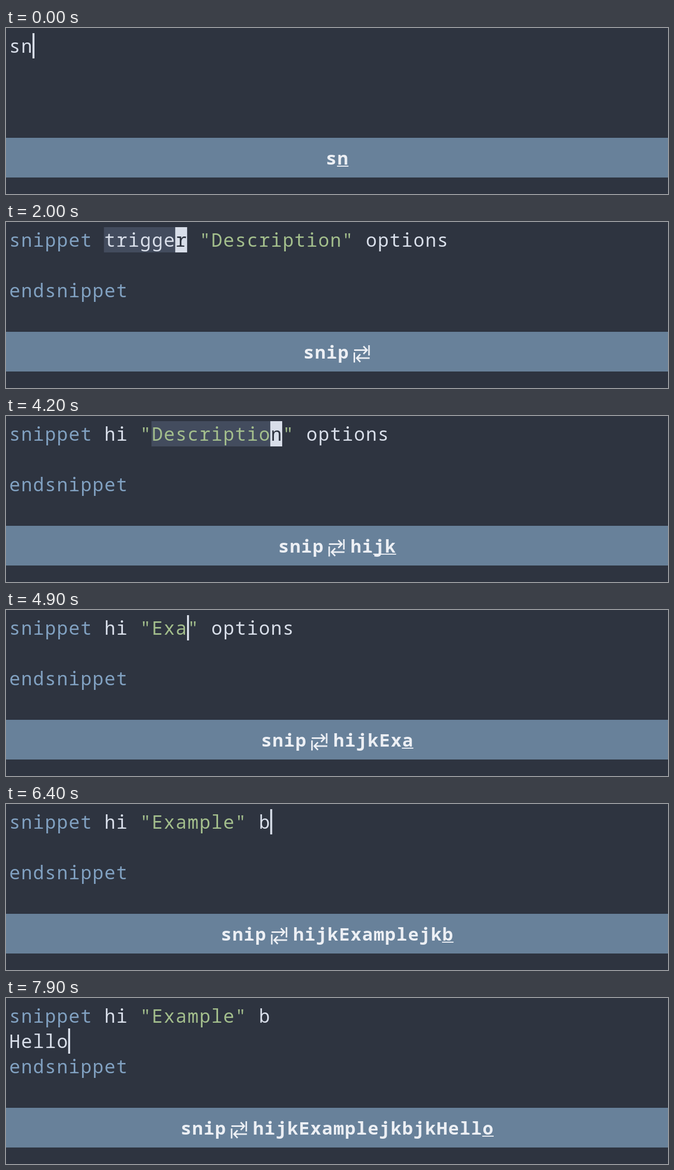
Animation, 1280 px wide and 322 px high, one loop 8 s. Source, as an HTML page:

```html
<!DOCTYPE html>
<html lang="en">
<head>
<meta charset="utf-8">
<title>Snippet expansion</title>
<style>
  html, body { margin: 0; width: 100%; height: 100%; overflow: hidden; background: #2e3440; }
  svg { display: block; width: 1280px; height: 322px; }
  text { font-family: "Noto Sans Mono", "DejaVu Sans Mono", monospace; white-space: pre; }
  .code { font-size: 35.5px; letter-spacing: 1.68px; }
  .key { font-size: 34.5px; font-weight: 700; letter-spacing: 1.5px; fill: #eceff4; }
</style>
</head>
<body>
<svg viewBox="0 0 1280 322">
  <rect width="1280" height="322" fill="#2e3440"/>
  <g id="editor"></g>
  <rect y="213" width="1280" height="77" fill="#68819a"/>
  <g id="keys"></g>
</svg>
<script>
const LOOP = 8000, HOLD = 200, EXPAND = 1900;
const CELL = 22.98, LEFT = 5.5, TOP = 10, ROW = 49;
const KEY = 22.2, TAB = 42.6, GAP = 8.4;
const BG = '#2e3440', FG = '#d8dee9', BLUE = '#81a1c1', GREEN = '#a3be8c', SELECT = '#434c5e';

// label, press time, optional time at which the underline goes
const presses = [
  ['s', -400], ['n', -100], ['i', 200], ['p', 500], ['tab', 1800],
  ['h', 3500], ['i', 3600], ['j', 4100], ['k', 4200, 4300],
  ['E', 4500], ['x', 4700], ['a', 4900], ['m', 5000], ['p', 5200], ['l', 5300], ['e', 5400],
  ['j', 5700, 6000], ['k', 5800],
  ['b', 6400], ['j', 6700], ['k', 6800],
  ['H', 7300], ['e', 7400], ['l', 7500], ['l', 7700], ['o', 7900]
];

const editor = document.getElementById('editor');
const keys = document.getElementById('keys');

const rect = (x, y, w, h, fill) =>
  `<rect x="${x}" y="${y}" width="${w}" height="${h}" fill="${fill}"/>`;
const colX = col => LEFT + col * CELL;
const put = (str, col, row, fill) =>
  `<text class="code" x="${colX(col) + 0.84}" y="${TOP + row * ROW + 38}" fill="${fill}">${str}</text>`;
const block = (col, row, n, fill) => rect(colX(col), TOP + row * ROW, n * CELL, ROW, fill);
const caret = (col, row) => rect(colX(col) - 0.2, TOP + row * ROW, 3.8, ROW, FG);

// Replays the presses: j then k jumps to the next field.
function replay(pressed) {
  const s = { fields: ['trigger', 'Description', 'options', ''], focus: 0, selected: true, pending: false };
  for (const [label] of pressed) {
    if (label === 'j') {
      s.pending = true;
    } else if (label === 'k') {
      s.pending = false;
      s.focus++;
      s.selected = s.fields[s.focus] !== '';
    } else {
      s.fields[s.focus] = (s.selected ? '' : s.fields[s.focus]) + label;
      s.selected = false;
    }
  }
  return s;
}

function drawEditor(t, pressed) {
  if (t < EXPAND) {
    const word = pressed.map(p => p[0]).filter(c => c !== 'tab').join('');
    return put(word, 0, 0, FG) + caret(word.length, 0);
  }
  const { fields, focus, selected, pending } = replay(pressed.slice(5));
  const [name, about, options, body] = fields;
  const quote = 9 + name.length;
  const last = quote + about.length + 3;
  const col = [8, quote + 1, last, 0][focus];
  const row = focus === 3 ? 1 : 0;
  const size = fields[focus].length;
  const end = col + size;

  let out = selected ? block(col, row, size, SELECT) : '';
  out += put('snippet', 0, 0, BLUE) + put(name, 8, 0, FG)
    + put(`"${about}"`, quote, 0, GREEN) + put(options, last, 0, FG)
    + put(body, 0, 1, FG) + put('endsnippet', 0, 2, BLUE);
  if (selected) {
    out += block(end - 1, row, 1, FG) + put(fields[focus].slice(-1), end - 1, row, BG);
  } else {
    if (pending) out += block(end, row, 1, BG) + put('j', end, row, FG);
    out += caret(end, row);
  }
  return out;
}

const tabIcon = x => `<path transform="translate(${x} 0)" fill="none" stroke="#eceff4" stroke-width="3"
  d="M10 248.5H34M28 241l7 7.5-7 7.5M38.8 239v20M40 264H16M22 256.5l-7 7.5 7 7.5M10.4 253v19.5"/>`;

function drawKeys(t, pressed) {
  let x = 0, out = '', afterTab = false;
  for (const [label, on, off = on + HOLD] of pressed) {
    const isTab = label === 'tab';
    const w = isTab ? TAB : KEY;
    if (afterTab) x += GAP;
    out += isTab ? tabIcon(x) : `<text class="key" x="${x + 0.75}" y="265">${label}</text>`;
    if (t < off) out += rect(x, 267, w, 2, '#eceff4');
    x += w;
    afterTab = isTab;
  }
  return `<g transform="translate(${640 - x / 2} 0)">${out}</g>`;
}

let shown = -1;
function render(now) {
  const t = Math.floor((now % LOOP) / 100) * 100;
  if (t !== shown) {
    shown = t;
    const pressed = presses.filter(p => p[1] <= t);
    editor.innerHTML = drawEditor(t, pressed);
    keys.innerHTML = drawKeys(t, pressed);
  }
}

const start = performance.now();
function tick() {
  render(performance.now() - start);
  requestAnimationFrame(tick);
}
tick();
</script>
</body>
</html>
```
